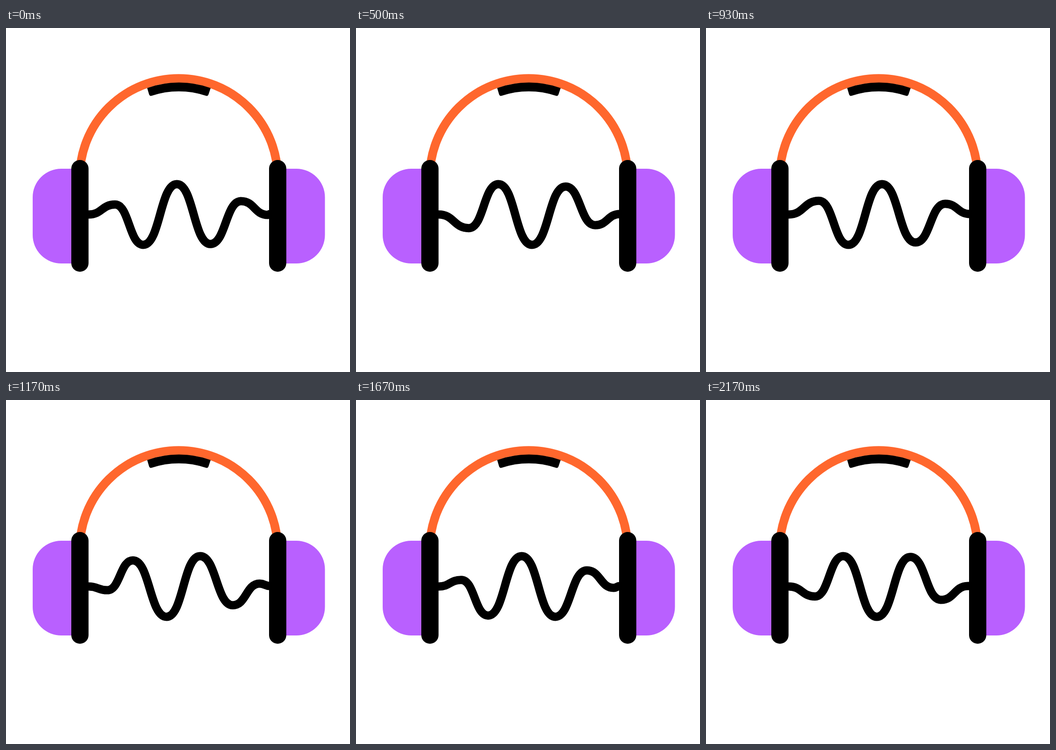
Animation, 748 px wide and 748 px high, one loop 2210 ms. Source, as an HTML page:

```html
<!DOCTYPE html>
<html lang="en">
<head>
<meta charset="utf-8">
<title>Headphones</title>
<style>
  html, body { margin: 0; width: 100%; height: 100%; overflow: hidden; background: #fff; }
  svg { display: block; width: 100%; height: 100%; }
</style>
</head>
<body>
<svg viewBox="0 0 748 748">
  <g fill="#b960ff">
    <path d="M150 306H120A62 62 0 0 0 58 368V450A62 62 0 0 0 120 512H150Z"/>
    <path d="M601 306H631.500A62 62 0 0 1 693.500 368V450A62 62 0 0 1 631.500 512H601Z"/>
  </g>
  <path d="M160.200 325A215.300 215.300 0 0 1 590.800 325" fill="none" stroke="#ff672d" stroke-width="18.800"/>
  <path d="M307 130.500A206 206 0 0 1 445 130.500L440.500 144Q439 148.800 434.500 147.300A187 187 0 0 0 317 147.300Q312.500 148.800 311 144Z"/>
  <path id="wave" fill="none" stroke="#000" stroke-width="18" stroke-linejoin="round"/>
  <rect x="142" y="287" width="37.500" height="243" rx="18.750"/>
  <rect x="572" y="287" width="37.500" height="243" rx="18.750"/>
</svg>
<script>
  const wave = document.getElementById('wave');
  const LOOP = 2210, MID = 405.5, HEIGHT = 66, HALF = 73;
  const LEFT = 180, RIGHT = 574;
  const START = 371.5, STEP = HALF / 13;

  function smooth(from, to, x) {
    const u = Math.min(1, Math.max(0, (x - from) / (to - from)));
    return u * u * (3 - 2 * u);
  }

  // Turning points crowd together near the ear pads
  function squeeze(x) {
    return x + 0.25 * Math.max(0, 272 - x) - 0.2 * Math.max(0, x - 485);
  }

  function height(x) {
    return HEIGHT * smooth(198, 300, x) * smooth(580, 430, x);
  }

  // 30 steps per second on a 10 ms clock; early on every third step is held
  function stepAt(t) {
    const n = Math.floor((Math.floor(t / 10) * 3 + 1) / 10);
    return n < 24 && n % 3 === 2 ? n - 1 : n;
  }

  // Crests and troughs between the two fixed ends
  function turns(n) {
    const crest = START + n * STEP;
    const list = [{ x: LEFT, y: MID }];
    for (let k = Math.ceil((176 - crest) / HALF); ; k++) {
      const x = squeeze(crest + k * HALF);
      if (x >= RIGHT - 3) break;
      list.push({ x, y: MID + (k % 2 ? 1 : -1) * height(x) });
    }
    list.push({ x: RIGHT, y: MID - 1 });
    return list;
  }

  function draw(n) {
    let d = `M${LEFT - 10} ${MID}H${LEFT}`;
    turns(n).reduce((a, b) => {
      const mid = (a.x + b.x) / 2;
      d += `C${mid} ${a.y} ${mid} ${b.y} ${b.x} ${b.y}`;
      return b;
    });
    wave.setAttribute('d', d + `H${RIGHT + 8}`);
  }

  const origin = performance.now();
  function tick() {
    draw(stepAt((performance.now() - origin) % LOOP));
    requestAnimationFrame(tick);
  }
  tick();
</script>
</body>
</html>
```
